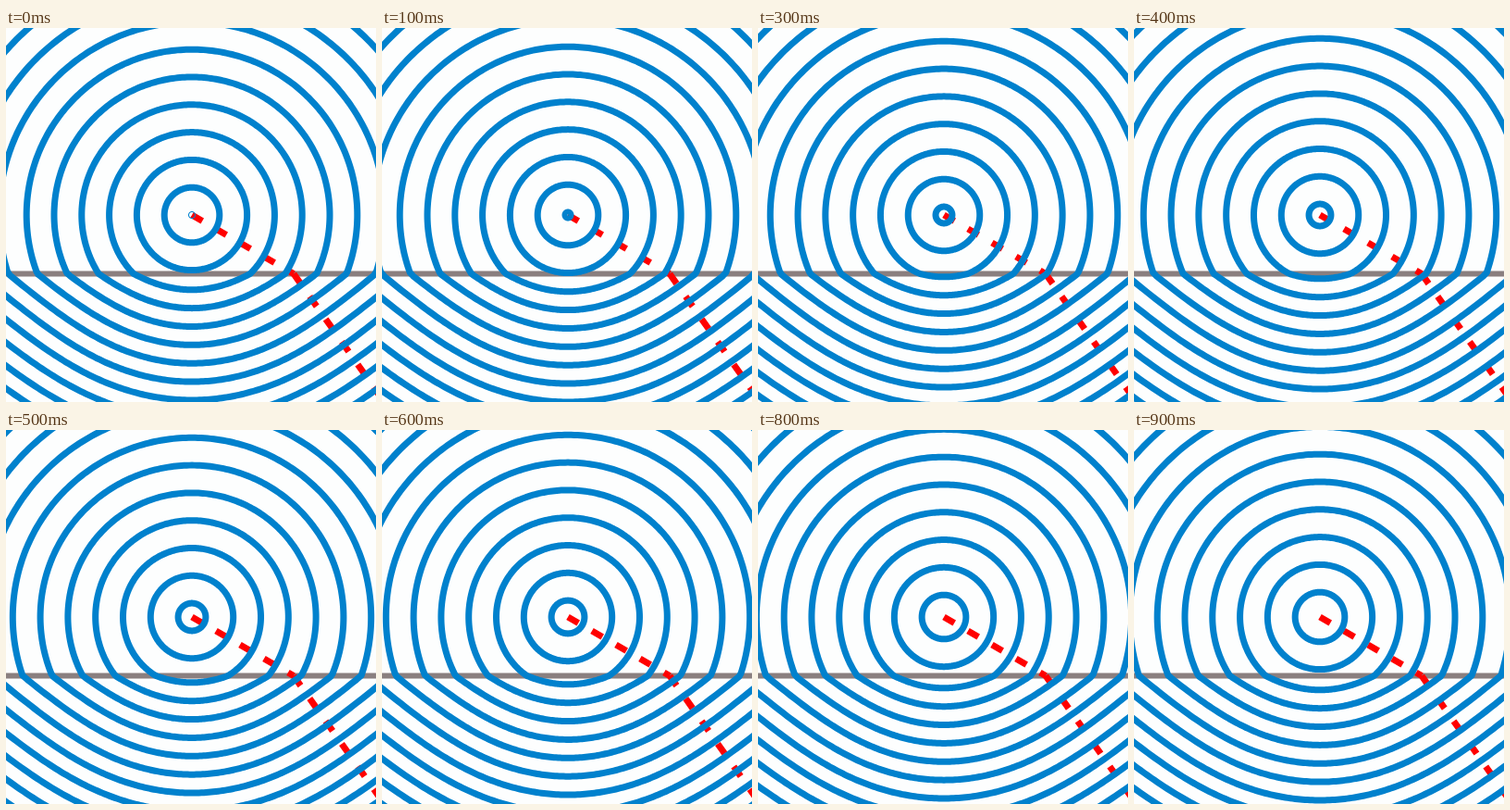
An HTML page with a canvas for the animation above (1000 ms loop, 400x404 px).

```html
<!DOCTYPE html>
<html lang="en">
<head>
<meta charset="utf-8">
<title>Refraction of circular waves</title>
<style>
  html, body { margin: 0; width: 100%; height: 100%; overflow: hidden; background: #fdfefe; }
  canvas { display: block; }
</style>
</head>
<body>
<canvas id="stage" width="400" height="404"></canvas>
<script>
const ctx = document.getElementById('stage').getContext('2d');
const cx = 201, cy = 202;      // wave source
const depth = 63.5;            // distance from source to interface
const index = 1.5;             // refractive index below the interface
const wavelength = 29.8, steps = 10, period = 1000;

// Point reached after optical path `len` by the ray at angle `a` from straight down.
function rayPoint(a, len) {
  const s = Math.sin(a), c = Math.cos(a);
  if (len * c <= depth) return [cx + len * s, cy + len * c];
  const rest = (len - depth / c) / index, s2 = s / index;
  return [cx + depth * s / c + rest * s2, cy + depth + rest * Math.sqrt(1 - s2 * s2)];
}

function line(points, color, width, dash = [], closed = false) {
  ctx.beginPath();
  for (const p of points) ctx.lineTo(...p);
  if (closed) ctx.closePath();
  ctx.strokeStyle = color;
  ctx.lineWidth = width;
  ctx.setLineDash(dash);
  ctx.stroke();
}

function wavefront(r) {
  const points = [];
  for (let i = 0; i < 360; i++) points.push(rayPoint(i * Math.PI / 180, r));
  line(points, '#0081cd', 7, [], true);
}

const angle = Math.PI / 3;
const bend = rayPoint(angle, depth / Math.cos(angle));
const end = rayPoint(angle, 450);
const dash = [13, 17];

function draw() {
  const step = Math.floor(performance.now() % period / period * steps);
  ctx.fillStyle = '#fdfefe';
  ctx.fillRect(0, 0, 400, 404);
  ctx.lineJoin = 'round';
  line([[-5, cy + depth], [405, cy + depth]], '#8a7f7f', 6);
  line([[cx, cy], bend], '#f00', 7, dash);
  line([bend, end], '#f00', 7, dash);
  for (let r = step * wavelength / steps; r < 420; r += wavelength) wavefront(Math.max(r, 0.5));
  requestAnimationFrame(draw);
}
draw();
</script>
</body>
</html>
```
